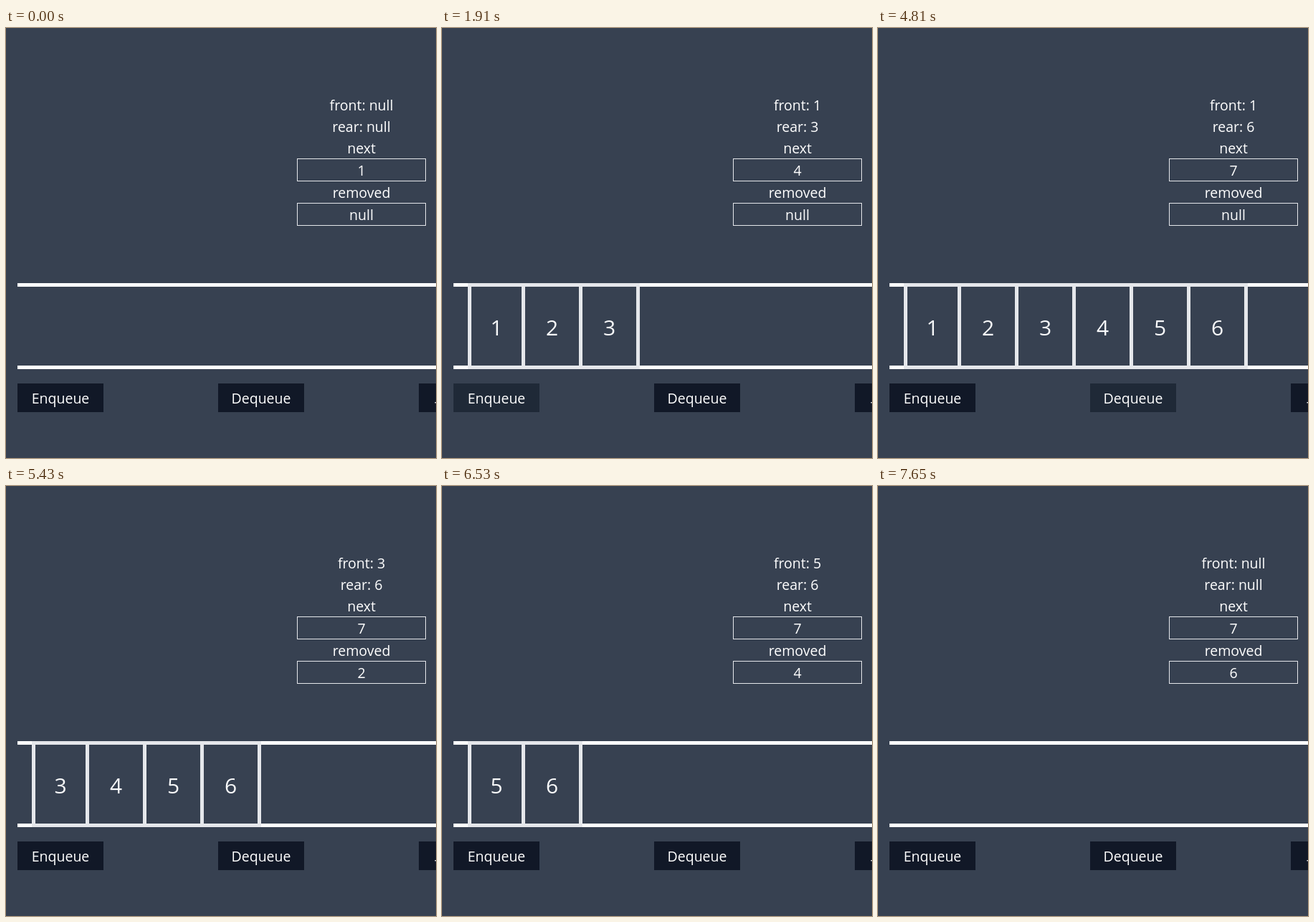
Recreate the animation shown at these times as an HTML page with a canvas. Size 600 by 600 pixels, loop 8150 ms.

```html
<!DOCTYPE html>
<html lang="en">
<head>
<meta charset="utf-8">
<title>Queue</title>
<style>
  html, body { margin: 0; width: 100%; height: 100%; overflow: hidden; background: #374151; }
  canvas { display: block; }
</style>
</head>
<body>
<canvas id="stage" width="600" height="600"></canvas>
<script>
const ctx = document.getElementById('stage').getContext('2d');
const LOOP = 8150;
const FONT = '"Open Sans", "Noto Sans CJK KR", "Noto Sans CJK", sans-serif';
const WHITE = '#ffffff', PALE = '#e5e7eb', DARK = '#111827', HOT = '#1f2937';

// Each press lights the button; its effect lands on release: [press, release]
const enqueues = [[400, 400], [890, 990], [1390, 1490], [1910, 2010], [2410, 2510], [2910, 3010]];
const dequeues = [[4810, 4920], [5320, 5430], [5920, 6030], [6430, 6530], [6940, 7040], [7540, 7650]];

const countDone = (presses, t) => presses.filter(p => t >= p[1]).length;
const isHeld = (presses, t) => presses.some(p => t >= p[0] && t < p[1]);

function rect(x, y, w, h, color) {
  ctx.fillStyle = color;
  ctx.fillRect(x, y, w, h);
}

function label(text, x, baseline, size = 19.5, color = WHITE) {
  ctx.font = `${size}px ${FONT}`;
  ctx.fillStyle = color;
  ctx.fillText(text, x, baseline);
}

function button(text, x, held) {
  rect(x, 496, 120, 40, held ? HOT : DARK);
  label(text, x + 60, 524);
}

function field(text, y) {
  ctx.strokeStyle = PALE;
  ctx.lineWidth = 1;
  ctx.strokeRect(406.5, y + 0.5, 179, 31);
  label(text, 496, y + 24);
}

function cell(value, slot) {
  const x = 36 + slot * 80;
  rect(x, 356, 80, 5, PALE);
  rect(x, 471, 80, 5, PALE);
  rect(x + 75, 356, 5, 120, PALE);
  if (slot === 0) rect(x, 356, 5, 120, PALE);
  label(value, slot === 0 ? x + 40 : x + 37.5, 429, 30, '#f9fafb');
}

function draw(t) {
  const added = countDone(enqueues, t);
  const removed = countDone(dequeues, t);
  const empty = added === removed;

  rect(0, 0, 600, 600, '#374151');
  ctx.textAlign = 'center';
  ctx.textBaseline = 'alphabetic';

  label(`front: ${empty ? 'null' : removed + 1}`, 496, 115);
  label(`rear: ${empty ? 'null' : added}`, 496, 145);
  label('next', 496, 175);
  field(added + 1, 182);
  label('removed', 496, 237);
  field(removed || 'null', 244);

  rect(16, 356, 584, 5, WHITE);
  rect(16, 471, 584, 5, WHITE);
  for (let i = removed; i < added; i++) cell(i + 1, i - removed);

  button('Enqueue', 16, isHeld(enqueues, t));
  button('Dequeue', 296, isHeld(dequeues, t));
  button('모두 제거', 576, false);
}

const start = performance.now();
function tick() {
  draw((performance.now() - start) % LOOP);
  requestAnimationFrame(tick);
}
tick();
</script>
</body>
</html>
```
